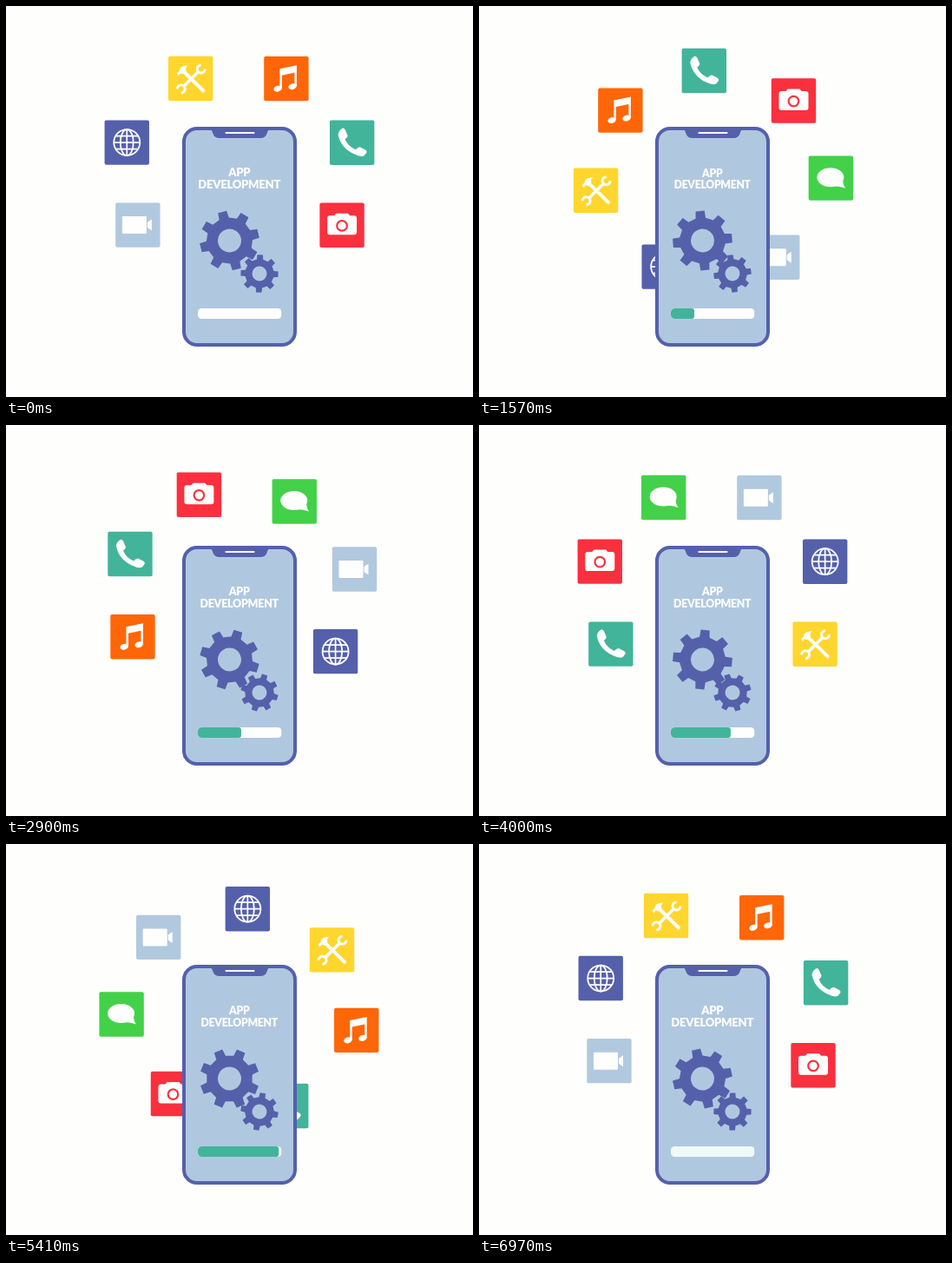
An HTML page that plays this animation: 538 px wide and 450 px high, repeating every 7 s.

```html
<!DOCTYPE html>
<html lang="en">
<head>
<meta charset="utf-8">
<title>App development</title>
<style>
  html, body { margin: 0; width: 100%; height: 100%; overflow: hidden; background: #fefefc; }
  svg { display: block; width: 100vw; height: 100vh; }
  text { font: 900 13.1px Lato, "Open Sans", sans-serif; letter-spacing: -.3px; text-anchor: middle; }
</style>
</head>
<body>
<svg viewBox="0 0 538 450">
  <defs>
    <clipPath id="barClip"><rect x="221" y="348" width="96.5" height="12" rx="4.5"/></clipPath>
  </defs>

  <!-- tiles are listed in the order in which they follow the path -->
  <g id="tiles" fill="#fefefc">
    <g data-color="#ffd62e">
      <g fill="none" stroke="#fefefc">
        <path d="M-8-8L14.500 14" stroke-width="4" stroke-linecap="round"/>
        <path d="M9-8L-8 9" stroke-width="3.6"/>
        <path d="M12-15.500A4.500 4.500 0 1 0 16.500-11M-15.500 12A4.500 4.500 0 1 1-11 16.500" stroke-width="3"/>
      </g>
      <path d="M-16-6L-13-9Q-13-15-3-15Q-7-12-5-9L-9-5L-12-6L-14-3Z"/>
    </g>
    <g data-color="#5560ab">
      <path d="M0-15V15M-15 0H15M-13-7.5H13M-13 7.5H13" stroke="#fefefc" stroke-width="1.7"/>
      <g fill="none" stroke="#fefefc" stroke-width="1.8"><circle r="15"/><ellipse rx="7.5" ry="15"/></g>
    </g>
    <g data-color="#b1c9df">
      <rect x="-18" y="-10" width="28" height="20" rx="1"/>
      <path d="M11-3L16-6.5V6.5L11 3Z"/>
    </g>
    <g data-color="#43d149">
      <ellipse cx="-.5" cy="-1" rx="15.5" ry="11"/>
      <path d="M4 9Q10 9 17 11.5Q14 8 14 3Z"/>
    </g>
    <g data-color="#fa303f">
      <path d="M-14-11H-9L-7-13.500H7L9-11H14Q17-11 17-8V8Q17 11 14 11H-14Q-17 11-17 8V-8Q-17-11-14-11Z"/>
      <circle cy=".6" r="5.8" fill="none" stroke="#fa303f" stroke-width="2.2"/>
    </g>
    <g data-color="#42b49a">
      <path d="M-12-16Q-16-13-16-9Q-13 6 2 13Q10 17 14 15L17 11Q17 9 15 8L9 5Q7 5 4 8Q-5 4-8-4Q-5-6-5-8L-8-15Q-10-18-12-16Z"/>
    </g>
    <g data-color="#ff6608">
      <path d="M-7.5-11.5L12-15.5V9H9.5V-7L-5-4V11H-7.5Z"/>
      <ellipse cx="-9.8" cy="11.5" rx="4.8" ry="3.4" transform="rotate(-15 -9.8 11.5)"/>
      <ellipse cx="7.2" cy="9" rx="4.8" ry="3.4" transform="rotate(-15 7.2 9)"/>
    </g>
  </g>

  <rect x="205" y="141" width="128" height="249" rx="15" fill="#b0c8df" stroke="#5560ab" stroke-width="4"/>
  <path d="M234 140H305Q302 142 300.500 147Q299 152 293 152H246Q240 152 238.500 147Q237 142 234 140Z" fill="#5560ab"/>
  <path d="M253.500 146H285.500" stroke="#fefefc" stroke-width="2.2" stroke-linecap="round"/>

  <g id="title" fill="#fefefc"><text y="-7">APP</text><text y="7">DEVELOPMENT</text></g>

  <g fill="#5560ab" fill-rule="evenodd"><path id="bigGear"/><path id="smallGear"/></g>

  <g clip-path="url(#barClip)">
    <rect x="221" y="348" width="96.5" height="12" fill="#fefefc"/>
    <rect id="fill" x="221" y="348" height="12" rx="3" fill="#42b49a"/>
  </g>
</svg>
<script>
const LOOP = 7, FULL = 5.6, FADE = .4, BAR = 96.5;
const $ = id => document.getElementById(id);

// one stop per second on the closed path, counter-clockwise
const stops = [[212.8, 83.5], [139.3, 157], [151.8, 252], [269, 317.5], [387, 252.4], [398.7, 157.3], [323, 83.7]];
const tiles = [...$('tiles').children];

for (const tile of tiles) {
  const box = document.createElementNS('http://www.w3.org/2000/svg', 'rect');
  const attrs = { x: -25.7, y: -25.7, width: 51.4, height: 51.4, rx: 2, fill: tile.dataset.color };
  for (const key in attrs) box.setAttribute(key, attrs[key]);
  tile.prepend(box);
}

// Catmull-Rom position at u seconds along the path
function along(u) {
  const i = Math.floor(u), t = u - i;
  const [a, b, c, d] = [6, 7, 8, 9].map(k => stops[(i + k) % 7]);
  return [0, 1].map(k => b[k] + t / 2 * (c[k] - a[k]
    + t * (2 * a[k] - 5 * b[k] + 4 * c[k] - d[k]
    + t * (3 * (b[k] - c[k]) + d[k] - a[k]))));
}

function gearPath(r) {
  const points = [];
  for (let i = 0; i < 8; i++)
    for (const [offset, k] of [[-12.5, .77], [-8.5, 1], [8.5, 1], [12.5, .77]]) {
      const a = (i * 45 + offset) * Math.PI / 180;
      points.push([r * k * Math.sin(a), -r * k * Math.cos(a)].map(v => v.toFixed(2)));
    }
  const h = r * .39;
  return `M${points.join('L')}ZM${h} 0A${h} ${h} 0 1 0 ${-h} 0A${h} ${h} 0 1 0 ${h} 0Z`;
}
$('bigGear').setAttribute('d', gearPath(34.5));
$('smallGear').setAttribute('d', gearPath(21.8));

const place = (el, x, y, more = '') => el.setAttribute('transform', `translate(${x} ${y}) ${more}`);

function draw(now) {
  const t = now / 1000 % LOOP, turn = t / LOOP * 360;
  tiles.forEach((tile, i) => place(tile, ...along(t + i)));
  place($('bigGear'), 257.5, 270, `rotate(${-14 - turn})`);
  place($('smallGear'), 292, 308, `rotate(${2 + turn})`);
  place($('title'), 268.7, 203, `scale(${.952 + .048 * Math.cos(turn * 3 * Math.PI / 180)})`);
  $('fill').setAttribute('width', BAR * Math.min(1, t / FULL));
  $('fill').setAttribute('opacity', Math.min(1, (LOOP - t) / FADE));
}

const start = performance.now();
function tick() {
  draw(performance.now() - start);
  requestAnimationFrame(tick);
}
tick();
</script>
</body>
</html>
```
